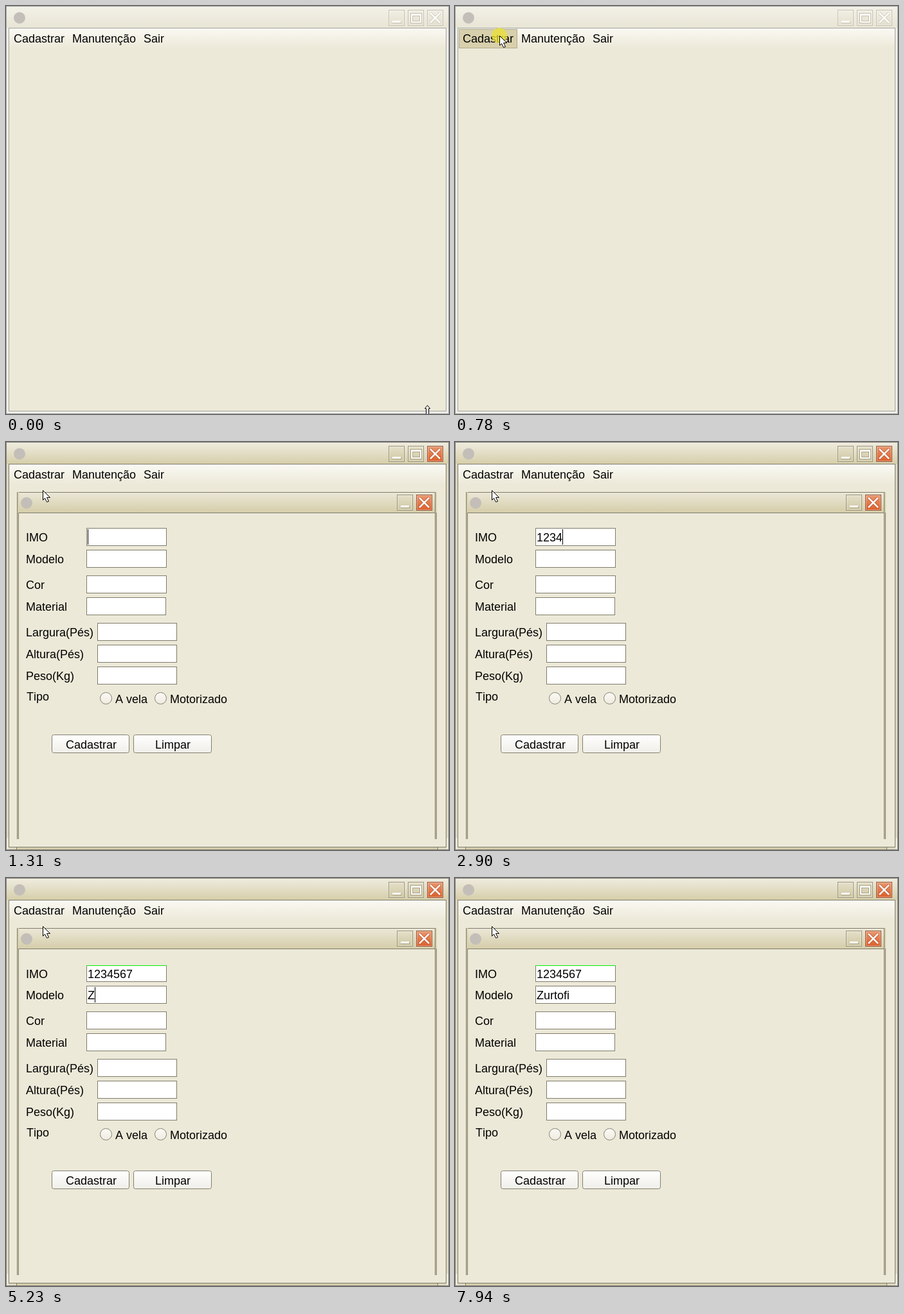
An HTML page with a canvas that plays this animation: 689 px wide and 636 px high, repeating every 8 s.

```html
<!DOCTYPE html>
<html lang="pt">
<head>
<meta charset="utf-8">
<style>
html, body { margin: 0; width: 689px; height: 636px; overflow: hidden; background: #ece9d8; }
canvas { display: block; }
</style>
</head>
<body>
<canvas id="stage" width="689" height="636"></canvas>
<script>
const LOOP = 8000, FORM_OPEN = 1310, TAB = 3820;
const c = document.getElementById('stage').getContext('2d');
const BG = '#ece9d8', TAN = '#d8d0ac', DARK = '#7f7c6c';

const imo = { text: '1234567', times: [2260, 2340, 2510, 2900, 3040, 3120, 3520], off: [[1860, 2260]] };
const model = {
  text: 'Zurtofi ', times: [5230, 5460, 5700, 5850, 5930, 6250, 6630, 7410],
  off: [[4370, 4850], [7160, 7410], [7940, LOOP]]
};

// Pointer samples: time, x, y
const path = [
  [70, 640, 604], [150, 583, 547], [220, 480, 450], [300, 355, 327], [380, 240, 213],
  [460, 142, 118], [530, 88, 64], [610, 69, 46], [1010, 66, 55], [1080, 61, 67], [1160, 57, 75]
];

function rect(x, y, w, h, fill) {
  c.fillStyle = fill;
  c.fillRect(x, y, w, h);
}
function frame(x, y, w, h, color) {
  c.strokeStyle = color;
  c.lineWidth = 1;
  c.strokeRect(x + .5, y + .5, w - 1, h - 1);
}
function box(x, y, w, h, fill, edge) {
  rect(x, y, w, h, fill);
  frame(x, y, w, h, edge);
}
function fade(y, h, top, bottom) {
  const g = c.createLinearGradient(0, y, 0, y + h);
  g.addColorStop(0, top);
  g.addColorStop(1, bottom);
  return g;
}
function text(s, x, y) {
  c.fillStyle = '#000';
  c.fillText(s, x, y);
}
function disc(x, y, r, fill, edge) {
  c.beginPath();
  c.arc(x, y, r, 0, 7);
  c.fillStyle = fill;
  c.fill();
  if (edge) {
    c.strokeStyle = edge;
    c.lineWidth = 1;
    c.stroke();
  }
}
function shape(x, y, points) {
  c.beginPath();
  points.forEach(([dx, dy]) => c.lineTo(x + dx + .5, y + dy + .5));
  c.closePath();
  c.fillStyle = '#fff';
  c.fill();
  c.strokeStyle = '#000';
  c.lineWidth = 1;
  c.stroke();
}

function cross(x, y, color, width) {
  c.strokeStyle = color;
  c.lineWidth = width;
  c.beginPath();
  c.moveTo(x + 5, y + 5);
  c.lineTo(x + 20, y + 20);
  c.moveTo(x + 20, y + 5);
  c.lineTo(x + 5, y + 20);
  c.stroke();
}
function titleButton(kind, x, y, active) {
  const hot = active && kind === 'close';
  const [top, bottom, edge] = hot ? ['#e99a72', '#dc5c28', '#94573b']
    : active ? ['#e5e0ca', '#cfc7a3', '#98947c'] : ['#f1efe5', '#e3dfcd', '#c5c2b4'];
  const shade = hot ? '#b44a22' : active ? '#aaa384' : '#c4c0ae';
  box(x, y, 25, 25, fade(y, 25, top, bottom), edge);
  c.strokeStyle = 'rgba(255,255,255,.35)';
  c.strokeRect(x + 1.5, y + 1.5, 22, 22);
  if (kind === 'min') {
    rect(x + 6, y + 18, 14, 3, shade);
    rect(x + 6, y + 17, 13, 3, '#fff');
  } else if (kind === 'max') {
    frame(x + 4, y + 5, 18, 16, shade);
    frame(x + 7, y + 9, 12, 9, shade);
    rect(x + 5, y + 6, 16, 3, '#fff');
    rect(x + 5, y + 6, 2, 14, '#fff');
    rect(x + 19, y + 6, 2, 14, '#fff');
    rect(x + 5, y + 18, 16, 2, '#fff');
  } else {
    cross(x, y, shade, 4);
    cross(x, y, '#fff', 2.6);
  }
}

function mainWindow(active) {
  const edge = active ? DARK : '#a3a3a0';
  box(0, 0, 689, 636, active ? '#ded9c3' : '#efeee8', active ? '#85837a' : '#a3a3a0');
  rect(1, 1, 687, 33, active ? fade(1, 33, '#efecdf', '#d6ceaa') : fade(1, 33, '#f3f1e8', '#e8e5d5'));
  if (active) {
    rect(1, 617, 3, 18, '#ece9d8');
    rect(685, 617, 3, 18, '#ece9d8');
    rect(16, 632, 656, 3, '#d6ceaa');
    rect(16, 632, 1, 4, DARK);
    rect(671, 632, 1, 4, DARK);
  }
  box(4, 34, 681, 598, BG, edge);
  rect(5, 35, 679, 31, fade(35, 31, '#faf9f3', BG));
  disc(21, 18.5, 9, '#c3beb8');
  titleButton('min', 595, 6, active);
  titleButton('max', 625, 6, active);
  titleButton('close', 655, 6, active);
}

function menuBar(hover, open) {
  if (hover) box(6, 36, 91, 30, TAN, open ? '#918d75' : '#b0aa8c');
  text('Cadastrar', 12, 57);
  text('Manutenção', 103, 57);
  text('Sair', 214, 57);
}
function popup(lit) {
  box(6, 66, 132, 60, BG, '#858169');
  rect(7, 65, 16, 60, TAN);
  rect(23, 66, 1, 59, '#858169');
  rect(24, 67, 113, 1, '#f8f6ec');
  if (lit) box(23, 67, 115, 29, TAN, '#979177');
  for (let y = 105; y < 122; y += 4) rect(19, y, 3, 2, '#fff');
  text('Iate', 30, 88);
  text('Fornecedor', 30, 117);
}

function typed(field, t) {
  return field.text.slice(0, field.times.filter(k => k <= t).length);
}
function entry(field, x, y, baseline, t, focused) {
  const s = typed(field, t);
  text(s, x, baseline);
  const hidden = field.off.some(([a, b]) => t >= a && t < b);
  if (focused && !hidden) rect(x + Math.round(c.measureText(s).width), y, 1, 24, '#000');
}
function pushButton(label, x, w, textX) {
  c.beginPath();
  c.roundRect(x + .5, 456.5, w - 1, 28, 3);
  c.fillStyle = fade(456, 29, '#ffffff', '#efeee8');
  c.fill();
  c.strokeStyle = '#827f70';
  c.lineWidth = 1;
  c.stroke();
  text(label, textX, 478);
}
function form(t) {
  const valid = t >= TAB;
  rect(17, 78, 653, 541, BG);
  rect(17, 79, 653, 31, fade(79, 31, '#ebe7d7', '#d5cda9'));
  rect(17, 78, 653, 1, DARK);
  for (const x of [17, 667]) {
    rect(x, 78, 3, 541, '#d5cda9');
    rect(x, 78, 1, 541, DARK);
    rect(x + 2, 110, 1, 509, DARK);
  }
  rect(19, 110, 649, 1, DARK);
  disc(32, 95, 9, '#c3beb8');
  titleButton('min', 608, 82, true);
  titleButton('close', 638, 82, true);

  [['IMO', valid ? 156 : 155], ['Modelo', 189], ['Cor', 229], ['Material', 263],
   ['Largura(Pés)', 303], ['Altura(Pés)', 337], ['Peso(Kg)', 371]]
    .forEach(([s, y]) => text(s, 31, y));
  text('Tipo', 32, 403);

  box(125, valid ? 136 : 134, 125, valid ? 26 : 28, '#fff', DARK);
  if (valid) rect(125, 136, 125, 1, '#00f000');
  box(125, 168, 125, 28, '#fff', DARK);
  box(125, 208, 125, 28, '#fff', DARK);
  box(125, 242, 124, 28, '#fff', DARK);
  for (const y of [282, 316, 350]) box(142, y, 124, 28, '#fff', DARK);
  entry(imo, 127, 136, valid ? 156 : 155, t, !valid);
  entry(model, 127, 170, 189, t, valid);

  for (const x of [155.5, 240.5]) disc(x, 399.5, 9, fade(390, 19, '#fbfaf6', '#eeebdf'), '#858274');
  text('A vela', 170, 407);
  text('Motorizado', 255, 407);
  pushButton('Cadastrar', 71, 121, 93);
  pushButton('Limpar', 198, 122, 232);
}

function pointer(t) {
  if (t < 70) {
    shape(655, 622, [[0, 0], [4, 5], [2, 5], [2, 14], [-2, 14], [-2, 5], [-4, 5]]);
    return;
  }
  const [, x, y] = path.filter(p => p[0] <= t).pop();
  if ((t >= 780 && t < 930) || (t >= 1230 && t < FORM_OPEN)) disc(x, y, 12, 'rgba(236,226,50,.75)');
  shape(x, y, [[0, 0], [0, 15], [3, 12], [6, 18], [9, 17], [6, 11], [11, 11]]);
}

function draw(now) {
  const t = now % LOOP;
  const open = t >= 860 && t < FORM_OPEN;
  c.font = '18px "Liberation Sans", Arial, sans-serif';
  c.fontKerning = 'none';
  mainWindow(t >= 860);
  menuBar(t >= 530 && t < FORM_OPEN, open);
  if (open) popup(t >= 1080);
  if (t >= FORM_OPEN) form(t);
  pointer(t);
}

const start = performance.now();
function tick() {
  draw(performance.now() - start);
  requestAnimationFrame(tick);
}
tick();
</script>
</body>
</html>
```
